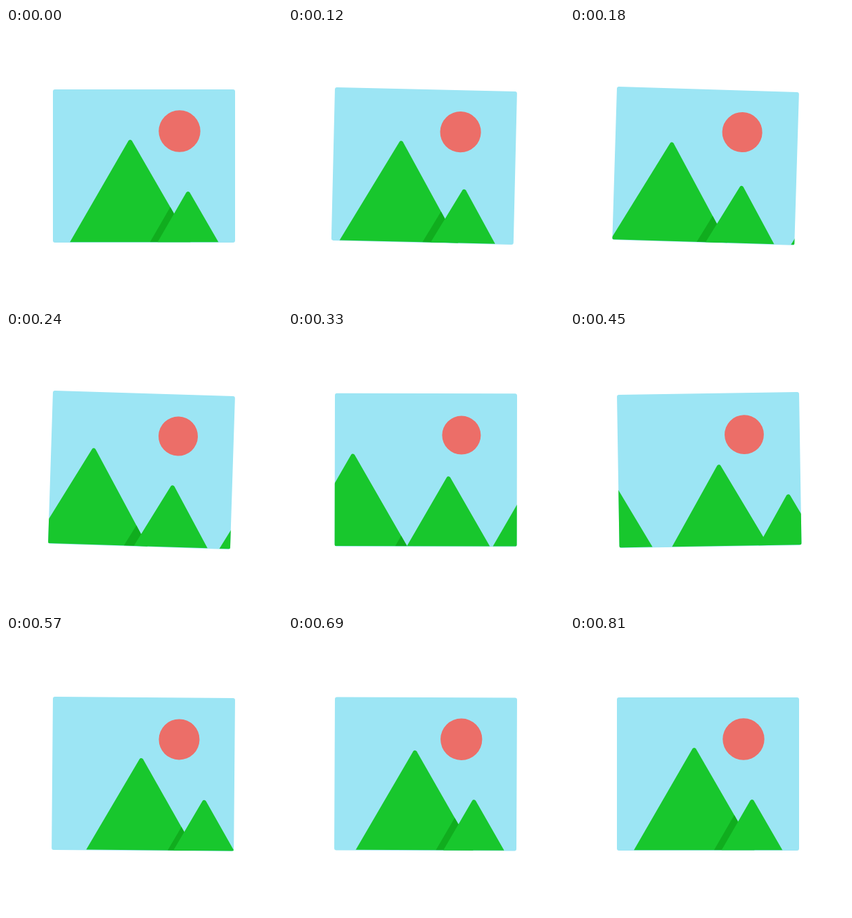
These frames come from a looping animation (400x400 px, 870 ms). An HTML page with a canvas:

```html
<!DOCTYPE html>
<html lang="en">
<head>
<meta charset="utf-8">
<title>Mountains</title>
<style>
  html, body { margin: 0; width: 100%; height: 100%; overflow: hidden; background: #fff; }
  canvas { display: block; width: 400px; height: 400px; }
</style>
</head>
<body>
<canvas id="stage" width="400" height="400"></canvas>
<script>
const ctx = document.getElementById('stage').getContext('2d');

const LOOP = 870, STEP = 30, LAST = 810, TRAVEL = 800;
const SKY = '#9ce5f4', GREEN = '#18c72d', SHADE = '#10ad1e', SUN = '#ec6e68';
const CARD = { x: 68, y: 89, w: 264, h: 222, r: 3 };
const GROUND = 310.3, TIP_R = 3, SLOPE = Math.tan(Math.PI / 6);

const clamp = v => Math.min(1, Math.max(0, v));
const mix = (a, b, p) => a + (b - a) * p;
const smooth = p => p * p * (3 - 2 * p);
const sineOut = p => Math.sin(p * Math.PI / 2);
const easeOut = p => p * (2 - p);

// keys: [time, value, easing into this key]
const TILT = [[0, 0], [230, 1.85, sineOut], [410, -1.15], [580, 0.5], [800, 0]];
const SUN_R = [[0, 30.2], [350, 28], [700, 30.2]];

function track(keys, t) {
  for (let i = 1; i < keys.length; i++) {
    const [t0, v0] = keys[i - 1], [t1, v1, ease = smooth] = keys[i];
    if (t < t1) return mix(v0, v1, ease((t - t0) / (t1 - t0)));
  }
  return keys[keys.length - 1][1];
}

function mountain(x, tip) {
  const apex = tip - TIP_R, half = (GROUND - apex) * SLOPE;
  const path = new Path2D();
  path.moveTo(x - half, GROUND);
  path.arcTo(x, apex, x + half, GROUND, TIP_R);
  path.lineTo(x + half, GROUND);
  path.closePath();
  return path;
}

function fill(path, color) {
  ctx.fillStyle = color;
  ctx.fill(path);
}

function shadow(path, onto, offset) {
  if (offset <= 0) return;
  ctx.save();
  ctx.clip(onto);
  ctx.translate(-offset, 0);
  fill(path, SHADE);
  ctx.restore();
}

function cardPath() {
  const { x, y, w, h, r } = CARD, path = new Path2D();
  path.moveTo(x + r, y);
  path.arcTo(x + w, y, x + w, y + h, r);
  path.arcTo(x + w, y + h, x, y + h, r);
  path.arcTo(x, y + h, x, y, r);
  path.arcTo(x, y, x + w, y, r);
  path.closePath();
  return path;
}

const card = cardPath();

function draw(t) {
  const p = smooth(clamp(t / TRAVEL));
  ctx.fillStyle = '#fff';
  ctx.fillRect(0, 0, 400, 400);
  ctx.save();

  // the card swings from the middle of its top edge
  ctx.translate(200, CARD.y);
  ctx.rotate(track(TILT, t) * Math.PI / 180);
  ctx.translate(-200, -CARD.y);
  fill(card, SKY);
  ctx.clip(card);

  const sun = new Path2D();
  sun.arc(251.5, 149.5, track(SUN_R, t), 0, Math.PI * 2);
  fill(sun, SUN);

  // each mountain moves into the place of the one to its left
  const left = mountain(mix(180, -52, p), mix(162, 202, p));
  const middle = mountain(mix(263.8, 180, p), mix(237, 162, p));
  const right = mountain(mix(387, 263.8, p), 237);
  fill(left, GREEN);
  shadow(middle, left, 11 + 16 * p);
  fill(middle, GREEN);
  shadow(right, middle, 11 * easeOut(clamp((p - 0.6) / 0.4)));
  fill(right, GREEN);

  ctx.restore();
}

const start = performance.now();

function tick() {
  const t = (performance.now() - start) % LOOP;
  draw(Math.min(LAST, Math.floor(t / STEP) * STEP));
  requestAnimationFrame(tick);
}
tick();
</script>
</body>
</html>
```
